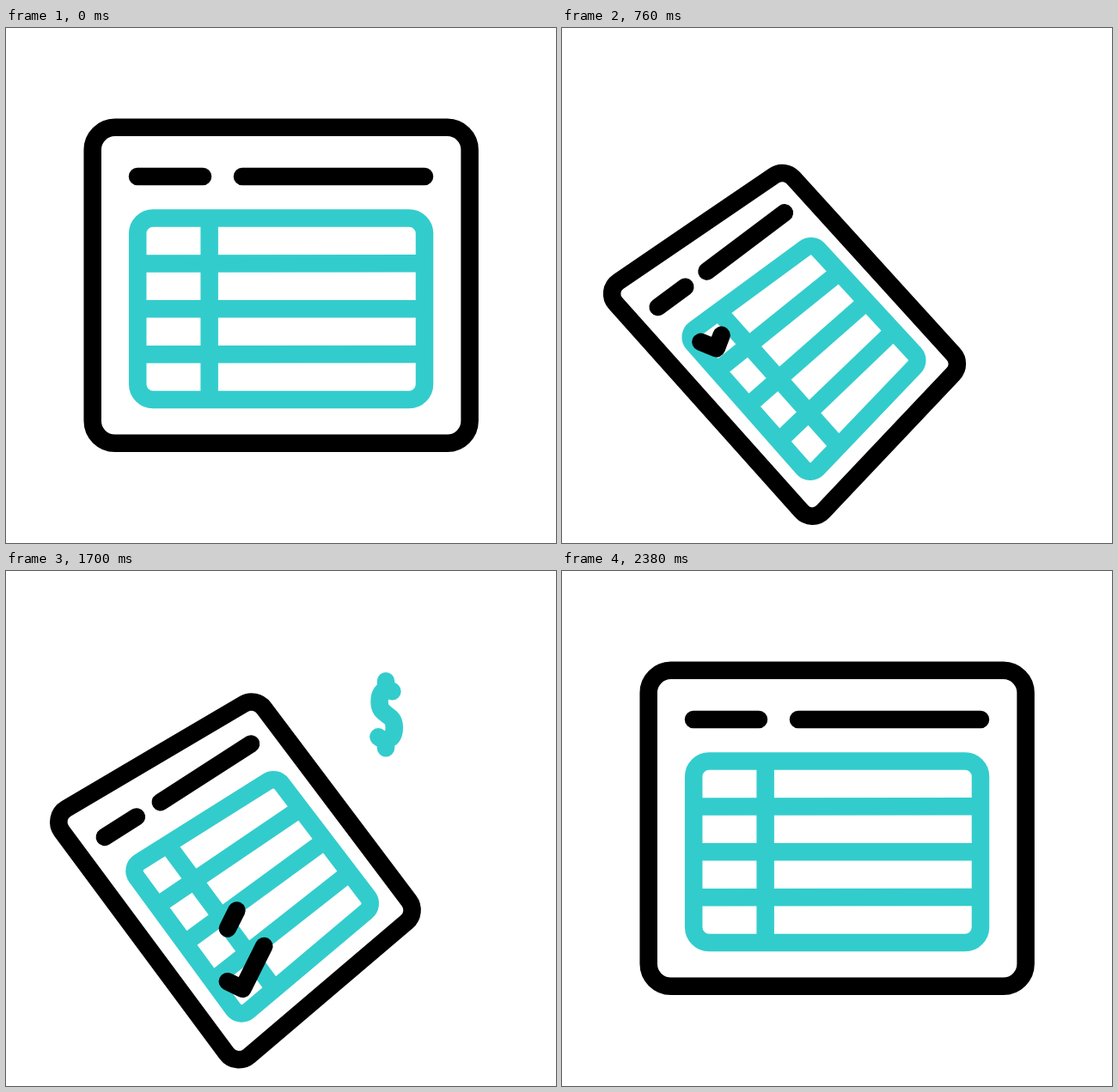
Recreate the animation shown at these times as an HTML page with a canvas. Size 640x600 px, loop 2400 ms.

```html
<!DOCTYPE html>
<html lang="en">
<head>
<meta charset="utf-8">
<title>Checklist</title>
<style>
  html, body { margin: 0; width: 100%; height: 100%; overflow: hidden; background: #fff; }
  canvas { display: block; }
</style>
</head>
<body>
<canvas id="stage" width="640" height="600"></canvas>
<script>
const ctx = document.getElementById('stage').getContext('2d');
const LOOP = 2400, BLACK = '#000', TEAL = '#33cccc';
const CX = 320, CY = 300, TURN = 50 * Math.PI / 180;

const clamp = x => Math.min(1, Math.max(0, x));
const mix = (a, b, k) => a + (b - a) * k;

function bezier(x1, y1, x2, y2) {
  const at = (a, b, s) => 3 * a * s * (1 - s) ** 2 + 3 * b * s * s * (1 - s) + s ** 3;
  return x => {
    if (x <= 0 || x >= 1) return clamp(x);
    let lo = 0, hi = 1;
    for (let i = 0; i < 30; i++) {
      const mid = (lo + hi) / 2;
      if (at(x1, x2, mid) < x) lo = mid; else hi = mid;
    }
    return at(y1, y2, lo);
  };
}
const swing = bezier(0.72, 0, 0.28, 1);
const rise = bezier(0.35, 0.2, 0.65, 0.95);

// Rotates a point, given relative to the centre, clockwise on screen.
function spin([x, y], a) {
  const c = Math.cos(a), s = Math.sin(a);
  return [x * c - y * s, x * s + y * c];
}

// Each point: flat x, y, then tilted x, y.
const frame = [
  [100.7, 115.8, 43.8, 334.6], [539.6, 115.8, 212.8, 194.2],
  [539.6, 483.8, 445.4, 384.9], [100.7, 483.8, 324.5, 569.6]
];
const table = [
  [153.2, 221.5, 143.5, 374.9], [487, 221.5, 257.5, 271.1],
  [487, 433, 400.9, 386.5], [153.2, 433, 313.1, 519.1]
];
const dashes = [
  [[153, 173, 106, 347], [229, 173, 130, 325]],
  [[275, 173, 151, 306], [487, 173, 220, 241]]
];
const tick = [
  [180, 237.6, 159.5, 383], [191, 252.6, 179, 388.5], [241, 230.6, 190.5, 333]
];

// Position of a point at tilt p: turning, reshaping and a slight sideways arc.
function place([x0, y0, x1, y1], p) {
  const end = spin([x1 - CX, y1 - CY], TURN);
  const u = (x0 - 101) / 439, v = (y0 - 116) / 368, arc = p * (1 - p);
  const x = mix(x0 - CX, end[0], p) + arc * (25 - 26 * p + u * (7 - 24 * p));
  const y = mix(y0 - CY, end[1], p) + arc * (80 + p * (20 - 35 * v));
  const out = spin([x, y], -TURN * p);
  return [out[0] + CX, out[1] + CY];
}

function line(pts) {
  ctx.beginPath();
  pts.forEach(q => ctx.lineTo(...q));
  ctx.stroke();
}

const between = (a, b, k) => [mix(a[0], b[0], k), mix(a[1], b[1], k)];

function roundQuad(q, r) {
  ctx.beginPath();
  ctx.moveTo(...between(q[0], q[1], 0.5));
  for (let i = 1; i <= 4; i++) ctx.arcTo(...q[i % 4], ...q[(i + 1) % 4], r);
  ctx.closePath();
  ctx.stroke();
}

function pen(color, cap) {
  ctx.strokeStyle = color;
  ctx.lineCap = cap;
}

function drawTable(p) {
  const q = table.map(c => place(c, p)), column = mix(0.25, 0.26, p);
  pen(TEAL, 'butt');
  roundQuad(q, mix(18, 10, p));
  line([between(q[0], q[1], column), between(q[3], q[2], column)]);
  for (const k of [0.25, 0.5, 0.75]) line([between(q[0], q[3], k), between(q[1], q[2], k)]);
}

function drawTick(row, p, from, to) {
  if (to - from < 0.002) return;
  const pts = tick.map(([x, y, tx, ty]) =>
    place([x, y + 52.8 * row, tx + 41.5 * row, ty + 33.2 * row], p));
  const size = [0, 1].map(i => Math.hypot(pts[i + 1][0] - pts[i][0], pts[i + 1][1] - pts[i][1]));
  const bend = size[0] / (size[0] + size[1]);
  const at = k => k < bend
    ? between(pts[0], pts[1], k / bend)
    : between(pts[1], pts[2], (k - bend) / (1 - bend));
  line(from < bend && to > bend ? [at(from), pts[1], at(to)] : [at(from), at(to)]);
}

function drawDollar(x, start, life, t) {
  const age = (t - start) / life;
  if (age <= 0 || age >= 1) return;
  ctx.save();
  ctx.translate(x, mix(184, 83, rise(age)));
  ctx.scale(Math.max(0.01, Math.sin(Math.PI * age)), 1);
  ctx.beginPath();
  ctx.moveTo(0, -39);
  ctx.lineTo(0, -29);
  ctx.moveTo(13, -27);
  ctx.bezierCurveTo(6, -31, -13, -30, -13, -15);
  ctx.bezierCurveTo(-13, 3, 17, -3, 17, 15);
  ctx.bezierCurveTo(17, 31, -4, 32, -15, 26);
  ctx.moveTo(0, 29);
  ctx.lineTo(0, 39);
  ctx.restore();
  pen(TEAL, 'round');
  ctx.stroke();
}

function draw(t) {
  const p = t < 1192 ? swing(t / 1200) : 1 - swing((t - 1192) / 1200);
  ctx.fillStyle = '#fff';
  ctx.fillRect(0, 0, 640, 600);
  ctx.lineJoin = 'round';
  ctx.lineWidth = 20.5;

  pen(BLACK, 'round');
  roundQuad(frame.map(c => place(c, p)), mix(26, 15, p));
  dashes.forEach(d => line(d.map(c => place(c, p))));

  drawTable(p);

  pen(BLACK, 'round');
  for (let row = 0; row < 4; row++) {
    const to = clamp((t - 706 - 110 * row) / 115);
    const from = clamp((t - 1400 - 111 * row) / 115);
    drawTick(row, p, from, to);
  }

  drawDollar(375, 1110, 520, t);
  drawDollar(442, 1592, 560, t);
}

const begin = performance.now();
function step() {
  draw((performance.now() - begin) % LOOP);
  requestAnimationFrame(step);
}
step();
</script>
</body>
</html>
```
